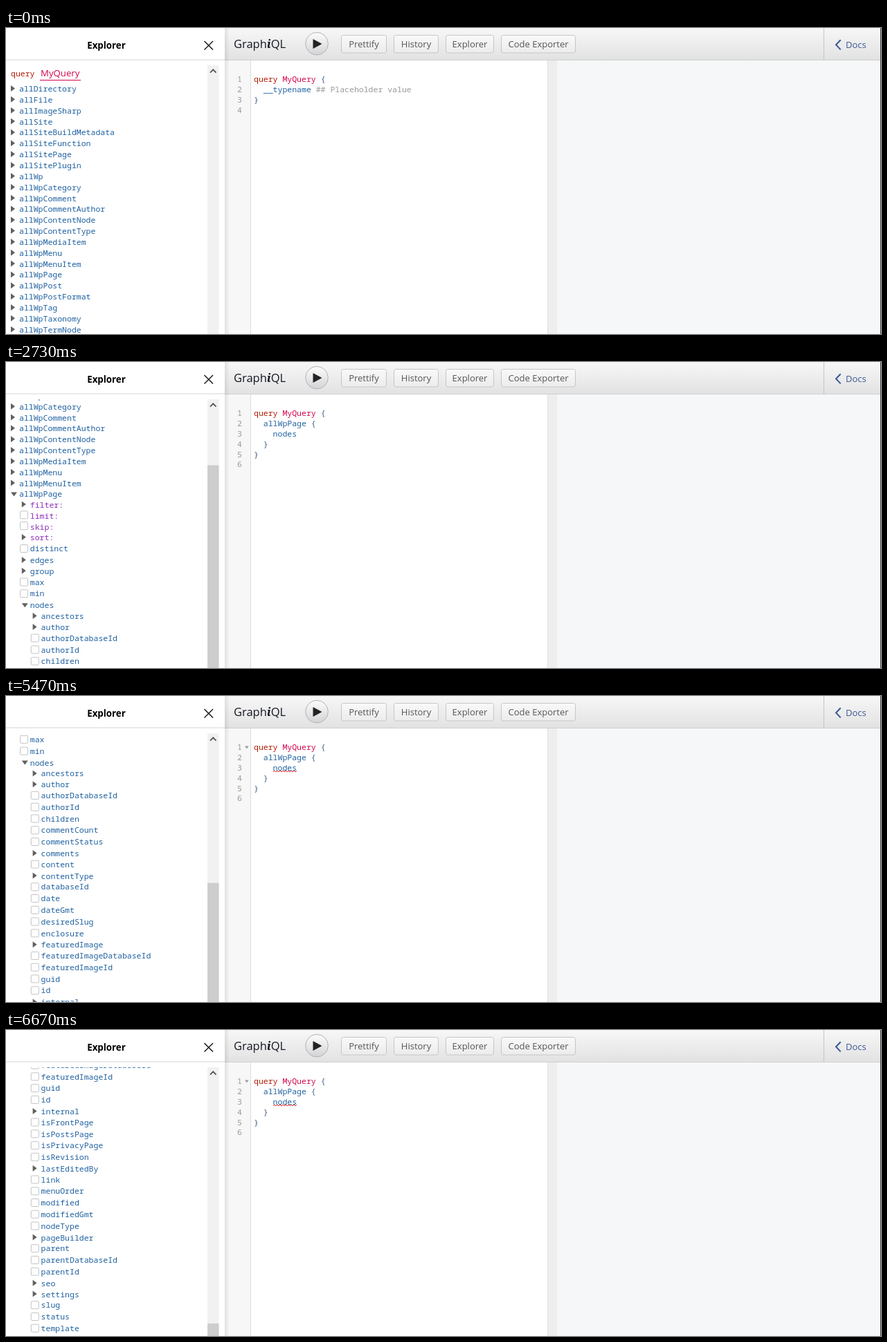
Recreate the animation shown at these times as an HTML page. Size 1264 by 443 pixels, loop 8000 ms.

```html
<!DOCTYPE html>
<html lang="en">
<head>
<meta charset="utf-8">
<title>GraphiQL explorer</title>
<style>
html, body { margin: 0; height: 100%; overflow: hidden; background: #fff; }
svg { display: block; }
text { white-space: pre; font: 13px "Open Sans", "Noto Sans", sans-serif; }
.mono text { font: 11.5px "Noto Sans Mono", monospace; }
.key { fill: #b11a04; }
.def { fill: #d2054e; }
.field { fill: #1f61a0; }
.arg { fill: #8b2bb9; }
.punct { fill: #3f5f8a; }
.note { fill: #999; }
.arrow { fill: #606060; }
.box { fill: #fff; stroke: #c4c4c4; }
.line { fill: none; stroke-linecap: square; }
</style>
</head>
<body>
<svg id="stage" width="1264" height="443" viewBox="0 0 1264 443">
  <defs>
    <linearGradient id="bar" x2="0" y2="1"><stop stop-color="#f7f7f7"/><stop offset="1" stop-color="#e2e2e2"/></linearGradient>
    <linearGradient id="btn" x2="0" y2="1"><stop stop-color="#f9f9f9"/><stop offset="1" stop-color="#ececec"/></linearGradient>
    <linearGradient id="knob" x2="0" y2="1"><stop stop-color="#fdfdfd"/><stop offset="1" stop-color="#d2d3d6"/></linearGradient>
    <linearGradient id="shade"><stop stop-color="#000" stop-opacity=".09"/><stop offset="1" stop-color="#000" stop-opacity="0"/></linearGradient>
  </defs>

  <rect x="316" width="948" height="46" fill="url(#bar)"/>
  <rect x="316" y="47" width="37" height="396" fill="#f7f7f7"/>
  <rect x="353" y="47" width="1" height="396" fill="#ddd"/>
  <rect x="782" y="47" width="15" height="396" fill="#e0e0e0"/>
  <rect x="783" y="47" width="13" height="396" fill="#eee"/>
  <rect x="796" y="47" width="468" height="396" fill="#f6f7f8"/>
  <rect x="316" y="46" width="948" height="1" fill="#d0d0d0"/>
  <text x="329" y="29" fill="#141823" style="font-size:16.5px">Graph<tspan style="font-family:'Noto Serif',serif;font-style:italic;font-weight:bold">i</tspan>QL</text>
  <circle cx="449" cy="22.7" r="16.3" fill="url(#knob)" stroke="#b2b2b2"/>
  <path d="M443.5 16v14l13-7z" fill="#222"/>
  <g id="buttons"></g>
  <rect x="1181" width="1" height="46" fill="#c4c4c4"/>
  <path class="line" d="M1205 18l-6 6.3 6 6.3" stroke="#3b5998" stroke-width="2"/>
  <text x="1213" y="28.5" fill="#3b5998">Docs</text>
  <rect x="1263" width="1" height="443" fill="#3c3c3c"/>
  <g id="editor" class="mono"></g>

  <rect x="316" width="7" height="443" fill="url(#shade)"/>
  <rect width="316" height="443" fill="#fff"/>
  <rect y="45.5" width="316" height="1" fill="#d6d6d6"/>
  <text x="145" y="29.7" text-anchor="middle" style="font-weight:bold;font-size:13.3px">Explorer</text>
  <path class="line" d="M287 19.500l11.500 11.500m0-11.500l-11.500 11.500" stroke="#111" stroke-width="1.4"/>
  <rect x="291" y="54" width="16.500" height="389" fill="#f1f1f1"/>
  <path class="line" d="M295.500 64l3.700-3.700 3.700 3.700" stroke="#505050" stroke-width="1.7"/>
  <rect id="thumb" x="291" width="16.500" height="500" fill="#cdcdcd"/>
  <svg x="0" y="54" width="291" height="389" viewBox="0 54 291 389"><g id="tree" class="mono"></g></svg>
</svg>
<script>
const LOOP = 8000, TICK = 83, TICK_MS = 200;
const OPEN_PAGE = 530, LINT_PAGE = 1060, OPEN_NODES = 2730, LINT_NODES = 3260;
const WHEEL = [937, 1853, 3110, 3260, 4505, 5427, 6020, 6230, 6450];

const $ = id => document.getElementById(id);
const text = (x, y, cls, s, more = '') => `<text x="${x}" y="${y}" class="${cls}" ${more}>${s}</text>`;

// Marks: ">" opens further, "v" is open, none means a checkbox.
const before = 'Directory File ImageSharp Site SiteBuildMetadata SiteFunction SitePage SitePlugin Wp WpCategory WpComment WpCommentAuthor WpContentNode WpContentType WpMediaItem WpMenu WpMenuItem';
const after = 'WpPost WpPostFormat WpTag WpTaxonomy WpTermNode';
const args = '>filter: limit: skip: >sort:';
const fields = 'distinct >edges >group max min';
const nodeFields = '>ancestors >author authorDatabaseId authorId children commentCount commentStatus >comments content >contentType databaseId date dateGmt desiredSlug enclosure >featuredImage featuredImageDatabaseId featuredImageId guid id >internal isFrontPage isPostsPage isPrivacyPage isRevision >lastEditedBy link menuOrder modified modifiedGmt nodeType >pageBuilder parent parentDatabaseId parentId >seo >settings slug status template';

function drawTree(level) {
  let y = 88;
  let out = text(7, 70, 'key', 'query') +
    text(50, 70.3, 'def', 'MyQuery', 'style="font:13.2px \'Open Sans\',sans-serif"') +
    '<rect x="49" y="75" width="59" height="1" class="def"/>';

  function row(item, depth, cls = 'field') {
    const mark = '>v'.includes(item[0]) && item[0], x = 7 + depth * 15.8;
    const isArg = cls === 'arg';
    const at = y + (isArg ? (mark ? -.3 : .3) : 0);
    if (mark === '>') out += `<path class="arrow" d="M${x} ${at - 5}l6 4.500-6 4.500z"/>`;
    else if (mark === 'v') out += `<path class="arrow" d="M${x} ${at - 3}h9l-4.500 6z"/>`;
    else out += `<rect class="box" x="${x - 2.3}" y="${at - (isArg ? 7.2 : 5.700)}" width="11" height="11" rx="1"/>`;
    out += text(x + 12, at + 4, cls, mark ? item.slice(1) : item);
    y += mark || isArg ? 15.85 : 16.77;
  }
  const rows = (list, depth, cls) => list.split(' ').forEach(s => row(s, depth, cls));
  const roots = list => list.split(' ').forEach(s => row('>all' + s, 0));

  roots(before);
  row((level ? 'v' : '>') + 'allWpPage', 0);
  if (level) {
    y -= .45;
    rows(args, 1, 'arg');
    rows(fields, 1);
    row((level > 1 ? 'v' : '>') + 'nodes', 1);
    if (level > 1) rows(nodeFields, 2);
  }
  roots(after);
  $('tree').innerHTML = out;
}

function squiggle(x, y, width) {
  let d = `M${x} ${y}`;
  for (let i = 0; i < width; i += 2) d += `l2 ${i % 4 ? 2 : -2}`;
  return `<path d="${d}" fill="none" stroke="#e01010" stroke-width=".9"/>`;
}

function drawEditor(level, lint) {
  const span = (cls, s) => `<tspan class="${cls}">${s}</tspan>`;
  const open = span('punct', '{'), close = span('punct', '}');
  const body = [
    ['  __typename ' + span('note', '## Placeholder value')],
    ['  allWpPage'],
    ['  allWpPage ' + open, '    nodes', '  ' + close]
  ][level];
  const lines = [span('key', 'query') + ' ' + span('def', 'MyQuery') + ' ' + open, ...body, close, ''];
  let out = lines.map((s, i) => {
    const y = 78.2 + i * 14.85;
    return text(341, y, 'note', i + 1, 'text-anchor="end"') + text(358, y, 'field', s);
  }).join('');
  if (lint && level === 1) out += squiggle(372, 95.500, 62);
  if (lint && level === 2) out += squiggle(386, 110, 34) + '<path d="M345 72.500h5.500l-2.750 4z" fill="#999"/>';
  $('editor').innerHTML = out;
}

// Cubic ease-in-out, x(s) solved by bisection for control points .42 and .58.
function ease(x) {
  if (x <= 0) return 0;
  if (x >= 1) return 1;
  let lo = 0, hi = 1;
  for (let i = 0; i < 20; i++) {
    const s = (lo + hi) / 2, r = 1 - s;
    if (3 * r * r * s * .42 + 3 * r * s * s * .58 + s ** 3 < x) lo = s; else hi = s;
  }
  return lo * lo * (3 - 2 * lo);
}

$('buttons').innerHTML = [['Prettify', 484.5, 65], ['History', 560.5, 64], ['Explorer', 635.5, 69], ['Code Exporter', 715.5, 107]]
  .map(([label, x, w]) => `<rect x="${x}" y="10.500" width="${w}" height="25.500" rx="3" fill="url(#btn)" stroke="#c6c6c6"/>` +
    text(x + w / 2, 27.6, '', label, 'text-anchor="middle" fill="#555"')).join('');

let shown = '';
function frame(now) {
  // The screen refreshes 15 times a second.
  const t = Math.floor((now % LOOP + 4) * .015) / .015 + 4;
  const level = (t >= OPEN_PAGE) + (t >= OPEN_NODES);
  const lint = t >= [LOOP, LINT_PAGE, LINT_NODES][level];
  const state = level + '/' + lint;
  if (state !== shown) {
    drawTree(level);
    drawEditor(level, lint);
    shown = state;
  }
  const scroll = WHEEL.reduce((sum, start) => sum + TICK * ease((t - 4 - start) / TICK_MS), 0);
  $('tree').setAttribute('transform', `translate(0 ${-scroll})`);
  $('thumb').setAttribute('y', level ? 70.8 + scroll * [0, .81, .474][level] : 443);
  requestAnimationFrame(frame);
}
requestAnimationFrame(frame);
</script>
</body>
</html>
```
